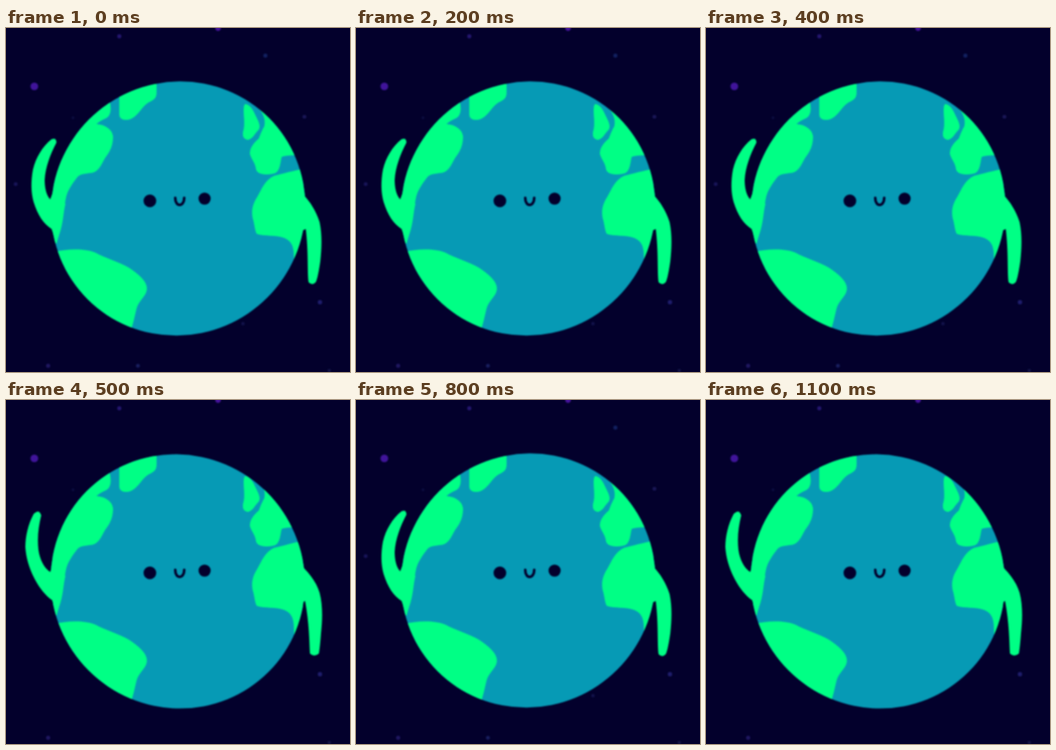
Recreate the animation shown at these times as an HTML page. Size 498 by 498 pixels, loop 1200 ms.

```html
<!DOCTYPE html>
<html>
<head>
<meta charset="utf-8">
<title>Waving Earth</title>
<style>
  html, body { margin: 0; width: 100%; height: 100%; overflow: hidden; background: #03002c; }
  svg { display: block; width: 100vw; height: 100vh; }
  .land, .arm { fill: #00ff85; }
</style>
</head>
<body>
<svg viewBox="0 0 498 498">
  <defs>
    <clipPath id="rim"><ellipse class="globe" rx="185.6" ry="182.4"/></clipPath>
    <filter id="soft" x="-5%" y="-5%" width="110%" height="110%" color-interpolation-filters="sRGB">
      <feGaussianBlur stdDeviation="1.25"/>
    </filter>
  </defs>
  <g filter="url(#soft)">
    <g id="stars"></g>
    <ellipse class="globe" rx="185.6" ry="182.4" fill="#069ab5"/>
    <g class="land" clip-path="url(#rim)">
      <path d="M164 90V126Q165 134 176 133C190 131 195 115 206 108C215 104 218 101 218 93V75Z"/>
      <path d="M150 105C153 118 152 127 144 131Q135 135 131 139C144 140 154 147 155 157C155 168 152 177 145 186C139 194 137 205 127 209C120 211 109 210 104 215C97 224 89 235 87 245C84 257 84 275 79 293L73 312L45 300L40 200L120 100Z"/>
      <path d="M65 325C90 319 114 319 129 325C146 334 162 338 178 347C193 357 204 367 204 377C204 387 194 393 190 403C187 412 186 423 180 440L60 445Z"/>
      <path d="M347 110C355 112 358 120 362 128C366 136 369 142 366 147C360 153 357 161 350 162C342 161 342 153 344 147C346 138 344 128 344 119Q344 110 347 110Z"/>
      <path d="M362 112C373 123 376 133 374 142C370 149 368 154 366 160C359 166 353 173 353 182C355 190 361 195 362 205C364 212 377 214 390 210C397 206 397 195 399 187Q401 184 430 184V120Z"/>
      <path d="M440 202C417 206 402 211 388 214C374 221 371 232 364 244C357 255 355 264 357 275C360 284 360 293 363 298C374 302 390 299 403 304C418 311 417 322 417 348L450 330Z"/>
    </g>
    <g class="arm">
      <path id="left"/>
      <path id="right"/>
    </g>
    <g fill="#03002c">
      <circle cx="208.3" cy="250.2" r="9.2"/>
      <circle cx="287.5" cy="247" r="8.8"/>
      <path d="M245 246C245 260 258 259 258 246" fill="none" stroke="#03002c" stroke-width="3.8" stroke-linecap="round"/>
    </g>
  </g>
</svg>
<script>
  const STEP = 100;
  const $ = id => document.getElementById(id);

  // x, y, radius, colour, twinkles
  const stars = [
    [307, 0, 4.2, '#45139a'], [41, 84.5, 5.6, '#40149a'], [164, 12, 3, '#251670'],
    [375.5, 40, 3, '#122060', 1], [432, 128.5, 2.8, '#191656', 1], [97, 130, 2, '#0e0e42'],
    [14, 226, 2.8, '#181458', 1], [454.5, 397, 3.2, '#1e1c6a'], [61, 489, 3, '#1f1660'],
    [191, 489, 2.8, '#191e5e', 1], [468, 496, 2.4, '#151548'], [343, 428, 2.5, '#12124a', 1]
  ];
  $('stars').innerHTML = stars.map(([x, y, r, color, twinkles]) =>
    `<circle cx="${x}" cy="${y}" r="${r}" fill="${color}"${twinkles ? ' class="twinkle"' : ''}/>`).join('');

  const poses = [
    {
      globe: 'translate(249.3 261.3) rotate(-45)',
      left: 'M66 161C53 171 43 188 39 205C36 221 36 238 40 252C46 271 54 283 66 291L73 312L86 255L70 232L64 248C58 242 56 230 56 220C57 202 64 183 73 166Q73 158 66 161Z',
      right: 'M431 242C440 251 449 265 454 281C458 300 457 320 455 338C453 352 451 361 449 367Q444 374 438 368C436 350 438 326 434 291L415 300Z'
    },
    {
      globe: 'translate(248.7 262.6) rotate(45)',
      left: 'M40 165C32 180 28 197 28 213C29 229 34 245 42 260C49 273 57 283 67 290L73 312L86 255L70 232L64 249C55 243 49 231 47 217C45 200 47 183 51 167Q48 157 40 165Z',
      right: 'M430 242C440 252 450 265 454 279C459 298 458 320 456 338C455 352 454 360 453 367Q446 373 440 367C439 348 439 324 433 291L415 300Z'
    }
  ];

  let shown = -1;
  function draw(time) {
    const index = Math.floor(time / STEP) % poses.length;
    if (index === shown) return;
    shown = index;
    const pose = poses[index];
    for (const globe of document.querySelectorAll('.globe')) globe.setAttribute('transform', pose.globe);
    for (const side of ['left', 'right']) $(side).setAttribute('d', pose[side]);
    for (const star of document.querySelectorAll('.twinkle')) star.style.opacity = 1 - index;
  }

  const start = performance.now();
  function tick() {
    draw(performance.now() - start);
    requestAnimationFrame(tick);
  }
  tick();
</script>
</body>
</html>
```
